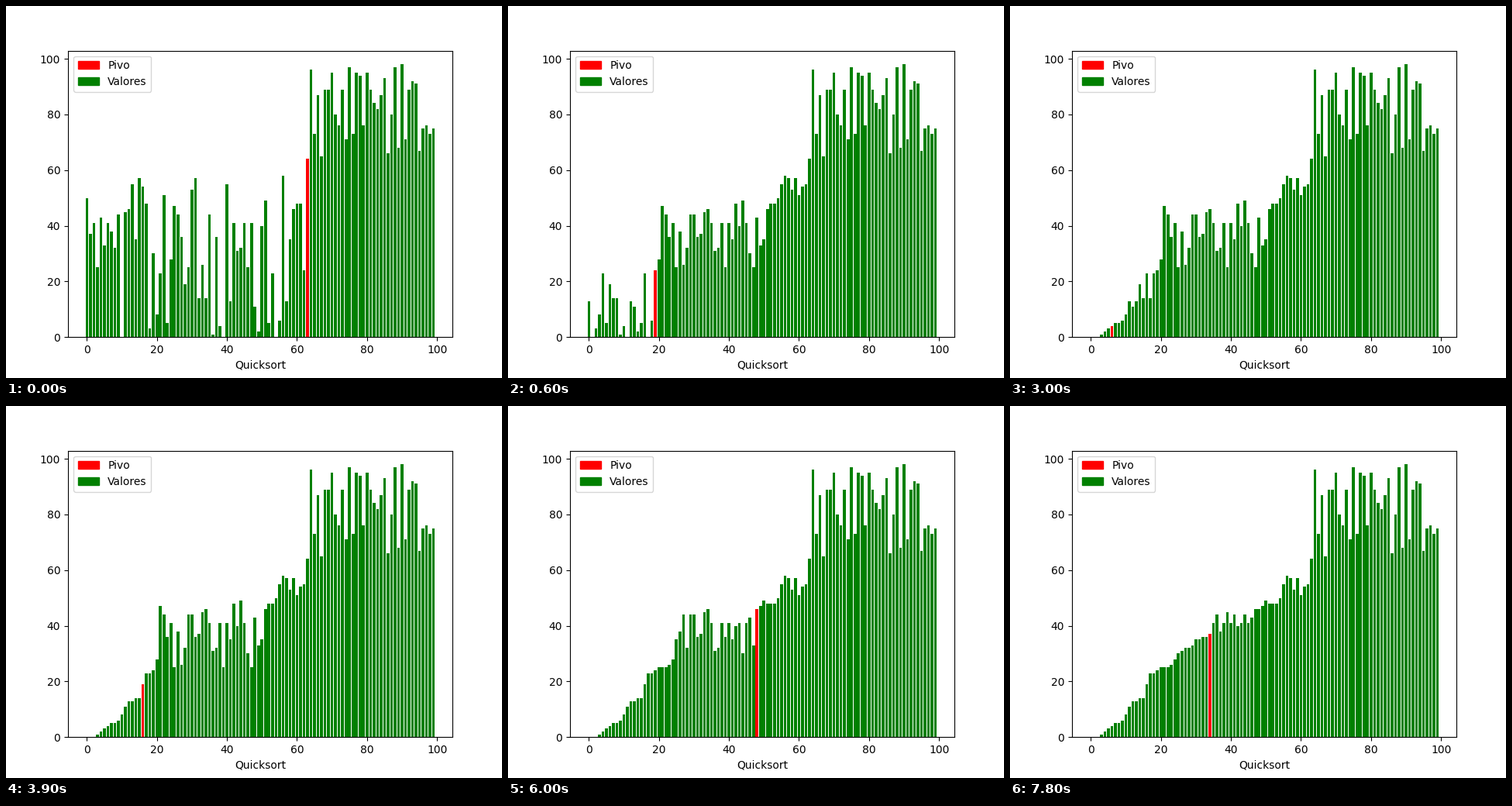
Write a matplotlib script that moves like this. It is 640x480 px and loops after 8000 ms.

```python
import matplotlib.pyplot as plt
from matplotlib.animation import FuncAnimation
from matplotlib.patches import Patch

TICK_MS = 100
TICKS_PER_STEP = 3
LOOP_MS = 8000

VALUES = [
    50, 37, 41, 25, 43, 33, 41, 38, 32, 44, 0, 45, 46, 55, 35, 57, 54, 48, 3, 30,
    8, 23, 51, 5, 28, 47, 44, 36, 19, 25, 53, 57, 14, 26, 14, 44, 1, 36, 4, 0,
    55, 13, 41, 31, 32, 41, 25, 41, 11, 2, 40, 49, 5, 23, 0, 6, 58, 13, 35, 46,
    48, 48, 24, 64, 96, 73, 87, 65, 89, 89, 95, 80, 76, 89, 71, 97, 73, 95, 94, 76,
    95, 89, 84, 82, 87, 93, 66, 80, 97, 68, 98, 71, 89, 92, 91, 67, 75, 76, 73, 75,
]
FIRST_PIVOT = 63


def partition(a, lo, hi):
    """Partition a[lo..hi] around its first item and return the pivot's place."""
    i = lo
    for j in range(lo + 1, hi + 1):
        if a[j] <= a[lo]:
            i += 1
            a[i], a[j] = a[j], a[i]
    a[lo], a[i] = a[i], a[lo]
    return i


def quicksort(a, lo, hi):
    """Yield (pivot index, snapshot) after every partition."""
    if lo < hi:
        p = partition(a, lo, hi)
        yield p, a[:]
        yield from quicksort(a, lo, p - 1)
        yield from quicksort(a, p + 1, hi)


steps = [(FIRST_PIVOT, VALUES[:])]
steps += quicksort(VALUES[:], 0, FIRST_PIVOT - 1)

fig, ax = plt.subplots(figsize=(6.4, 4.8), dpi=100)
bars = ax.bar(range(len(VALUES)), VALUES, color="green")
ax.set_xlabel("Quicksort")
ax.legend(
    handles=[Patch(color="red", label="Pivo"), Patch(color="green", label="Valores")],
    loc="upper left",
)


def draw(tick):
    pivot, heights = steps[tick // TICKS_PER_STEP]
    for i, (bar, height) in enumerate(zip(bars, heights)):
        bar.set_height(height)
        bar.set_color("red" if i == pivot else "green")
        bar.set_linewidth(0)
    return bars


anim = FuncAnimation(fig, draw, frames=LOOP_MS // TICK_MS, interval=TICK_MS,
                     repeat=True, repeat_delay=0)
plt.show()
```
